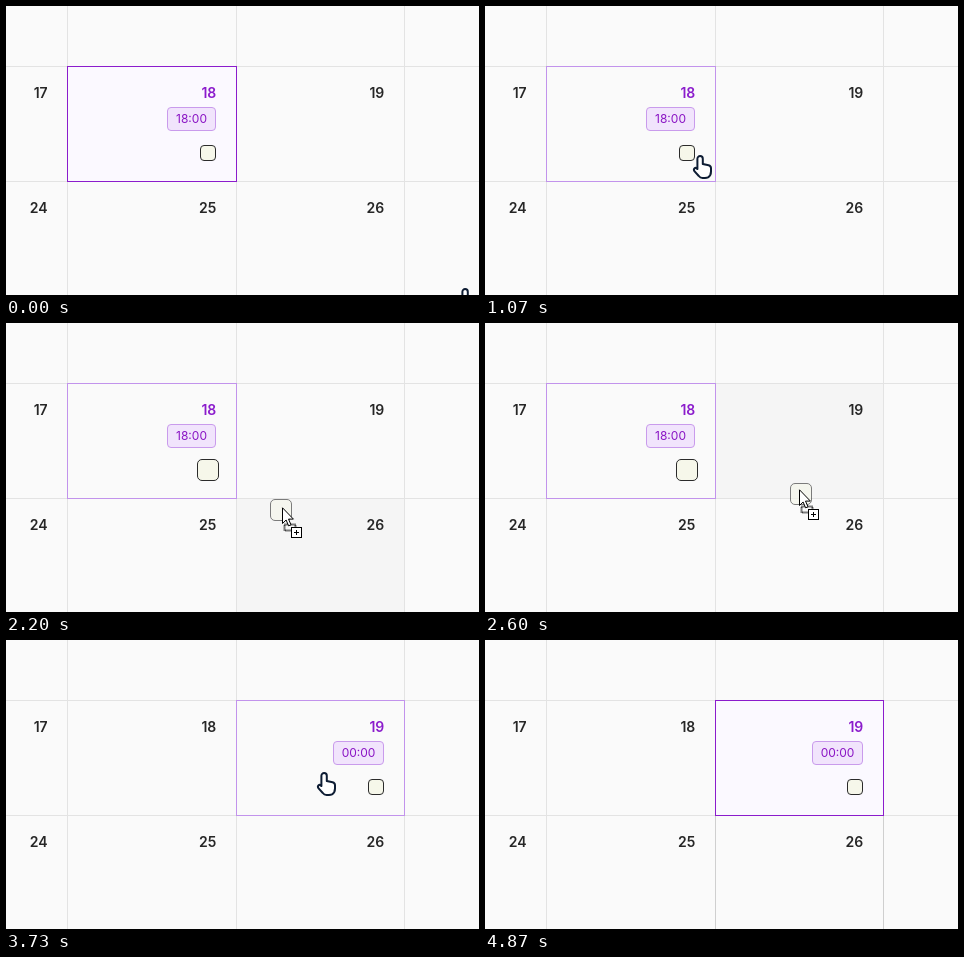
An HTML page for the animation above (6.27 s loop, 473 by 289 pixels).

```html
<!DOCTYPE html>
<html lang="en">
<head>
<meta charset="utf-8">
<title>Calendar drag and drop</title>
<style>
html, body { margin: 0; width: 100%; height: 100%; overflow: hidden; background: #fafafa; }
svg { display: block; width: 473px; height: 289px; }
text { font-family: Inter, Roboto, sans-serif; }
.day { font-size: 14px; font-weight: 600; text-anchor: end; fill: #262626; }
.time { font-size: 12px; text-anchor: middle; fill: #8a14c4; }
.pill { fill: #f1e4fc; stroke: #c99bec; }
.box { fill: #f6f7ea; stroke: #2b2b2b; }
</style>
</head>
<body>
<svg id="stage" viewBox="0 0 473 289">
  <g id="fills"></g>
  <path d="M61.5 0V289M230.5 0V289M398.5 0V289M0 60.5H473M0 175.5H473" stroke="#e3e3e3" fill="none"/>
  <g id="borders" fill="none"></g>
  <g id="days"></g>
  <g id="event">
    <rect class="pill" id="pill" y="101.5" height="23" rx="3.5"/>
    <text class="time" id="time" y="117.4"></text>
    <rect class="box" id="box"/>
  </g>
  <rect class="box" id="ghost" width="21" height="21" rx="4.5" opacity=".6"/>
  <g id="point">
    <path transform="translate(-1 -2)" fill="#fff" stroke="#0d1c33" stroke-width="2" stroke-linejoin="round"
      d="M-2.6 14V3.8a2.7 2.7 0 0 1 5.4 0V9L8.6 10.3Q11 10.9 11 13.3V16.4Q11 20.4 8 22.4Q6.8 23 5 23H2.6Q.2 23-1.2 21L-5.4 16.4Q-6.8 14.4-5.4 13.2Q-4.2 12.3-2.6 14Z"/>
  </g>
  <g id="grab" stroke-linecap="round" stroke-linejoin="round">
    <path id="palm" d="M-4.6 -5.2L-2.8 0M-.9 -7.2L-.4 0M2.7 -6.6L2.4 0M6 -3.6L5.2 2M-6.9 .6L-3.4 4M-3.2 0L-3.4 4L-1.4 7H3.6L5.2 2L3 -.4Z" fill="#fff" stroke="#000" stroke-width="4.4"/>
    <use href="#palm" id="inner"/>
    <path d="M-4.6 -5.2L-2.8 0M-.9 -7.2L-.4 0M2.7 -6.6L2.4 0M6 -3.6L5.2 2M-6.9 .6L-3.4 4M-3.2 0L-3.4 4L-1.4 7H3.6L5.2 2L3 -.4Z" fill="#fff" stroke="#fff" stroke-width="2.4"/>
  </g>
  <g id="copy">
    <rect x="2.5" y="17.5" width="11" height="6" fill="none" stroke="#000" stroke-width="2" stroke-dasharray="1 1"/>
    <path d="M.5 .8V16.5L4.1 13L6.6 18.8L9 17.8L6.5 12.1H11.4Z" fill="#fff" stroke="#000"/>
    <rect x="9.5" y="20.5" width="10" height="10" fill="#fff" stroke="#000"/>
    <path d="M12 25.5H17M14.5 23V28" stroke="#000"/>
  </g>
</svg>
<script>
const LOOP = 6270, STEP = 1000 / 15;
// step numbers of the main beats
const DRAG = 28, DROP = 51, MOVED = 52, SETTLED = 56, GONE = 73;

const $ = id => document.getElementById(id);
const clamp = v => Math.max(0, Math.min(1, v));
const set = (el, attrs) => { for (const k in attrs) el.setAttribute(k, attrs[k]); return el; };
const add = (parent, tag, attrs) =>
  parent.appendChild(set(document.createElementNS('http://www.w3.org/2000/svg', tag), attrs));
const show = (id, on) => { $(id).style.display = on ? '' : 'none'; };
const mix = (a, b, p) => a.map((v, i) => v + (b[i] - v) * p);
const rgb = c => `rgb(${c.map(Math.round)})`;

const GRID = [227, 227, 227], HOVER = [187, 187, 187], DARK = [139, 28, 204], LIGHT = [194, 147, 236];
const PAPER = [250, 250, 250], TINT = [251, 249, 255], OVER = [245, 245, 245], INK = [38, 38, 38];

const cells = [[18, 61, 60], [19, 230, 60], [25, 61, 175], [26, 230, 175]].map(([day, x, y]) => {
  const w = x === 61 ? 169 : 168, h = 115;
  const frame = { x: x + .5, y: y + .5, width: w, height: h };
  const label = add($('days'), 'text', { class: 'day', x: x + w - 20 + .3, y: y + 32 });
  label.textContent = day;
  return { day, x, y, w, h, label, fill: add($('fills'), 'rect', frame), border: add($('borders'), 'rect', frame) };
});
[[17, 92], [24, 207]].forEach(([day, y]) => {
  add($('days'), 'text', { class: 'day', x: 41.7, y }).textContent = day;
});

// pointer path: step, x, y
const PATH = [
  [0, 460, 284], [10, 317, 213], [17, 208, 147], [20, 200, 143], [22, 199, 143], [27, 200, 144],
  [33, 276, 184], [37, 311, 176], [45, 319, 134], [68, 319, 134],
  [70, 322, 150], [72, 326, 219], [73, 328, 310]
];

// smooth curve through the points, without overshoot
function slope(i, k) {
  const a = PATH[i - 1], b = PATH[i], c = PATH[i + 1];
  if (!a) return (c[k] - b[k]) / (c[0] - b[0]);
  if (!c) return (b[k] - a[k]) / (b[0] - a[0]);
  const l = (b[k] - a[k]) / (b[0] - a[0]), r = (c[k] - b[k]) / (c[0] - b[0]);
  return l * r <= 0 ? 0 : 2 * l * r / (l + r);
}
function pointer(n) {
  n = Math.max(0, Math.min(GONE, n));
  let i = 0;
  while (i < PATH.length - 2 && n > PATH[i + 1][0]) i++;
  const a = PATH[i], b = PATH[i + 1], d = b[0] - a[0], u = (n - a[0]) / d;
  return [1, 2].map(k =>
    a[k] * (1 + 2 * u) * (1 - u) ** 2 + b[k] * u * u * (3 - 2 * u) +
    d * (slope(i, k) * u * (1 - u) ** 2 + slope(i + 1, k) * u * u * (u - 1)));
}

const inside = (c, [x, y]) => x >= c.x && x < c.x + c.w && y >= c.y && y < c.y + c.h;
const dragging = n => n >= DRAG && n < DROP;
const hovered = (c, n) => n < GONE && (dragging(n) ? c.day === 18 : inside(c, pointer(n)));
const onBox = n => {
  if (n >= DROP) return false;
  const [x, y] = pointer(n);
  return dragging(n) || Math.abs(x - 202) < 10 && Math.abs(y - 147) < 10;
};
const ease2 = (test, n) => (test(n) + test(n - 1)) / 2;

function draw(n) {
  const pos = pointer(n), drag = dragging(n), moved = n >= MOVED;
  const shift = clamp((n - DROP) / (SETTLED - DROP));

  for (const c of cells) {
    const owner = c.day === 18 ? 1 - shift : c.day === 19 ? shift : 0;
    const h = ease2(m => hovered(c, m), n);
    const target = drag && c.day !== 18 && inside(c, pos);
    set(c.fill, { fill: rgb(target ? OVER : mix(PAPER, TINT, owner * (1 - h))) });
    set(c.border, {
      stroke: owner + h > 0 ? rgb(mix(mix(GRID, HOVER, h), mix(DARK, LIGHT, h), owner)) : 'none'
    });
    c.label.style.fill = rgb(mix(INK, DARK, owner));
  }
  $('borders').appendChild(cells[moved ? 1 : 0].border);

  const right = moved ? 378 : 210, width = moved ? 51 : 49;
  set($('pill'), { x: right - width + .5, width: width - 1 });
  set($('time'), { x: right - width / 2 });
  $('time').textContent = moved ? '00:00' : '18:00';

  const big = ease2(onBox, n), size = 15 + 6 * big;
  set($('box'), {
    x: right - 8 - size / 2, y: 147 - size / 2, width: size, height: size, rx: 3.5 + big
  });

  show('ghost', drag);
  const [gx, gy] = pointer(Math.max(27, n - .25));
  set($('ghost'), { x: Math.round(gx) - 8.5, y: Math.round(gy) - 7.5 });

  const grab = onBox(n) && !drag;
  const at = `translate(${pos.map(Math.round).join(' ')})`;
  [['copy', drag], ['grab', grab], ['point', !drag && !grab && n < GONE]].forEach(([id, on]) => {
    show(id, on);
    set($(id), { transform: at });
  });
}

$('inner').remove();
let start = null;
function tick(now) {
  if (start === null) start = now;
  draw(Math.floor(((now - start) % LOOP + 3.4) / STEP) % 94);
  requestAnimationFrame(tick);
}
draw(0);
requestAnimationFrame(tick);
</script>
</body>
</html>
```
